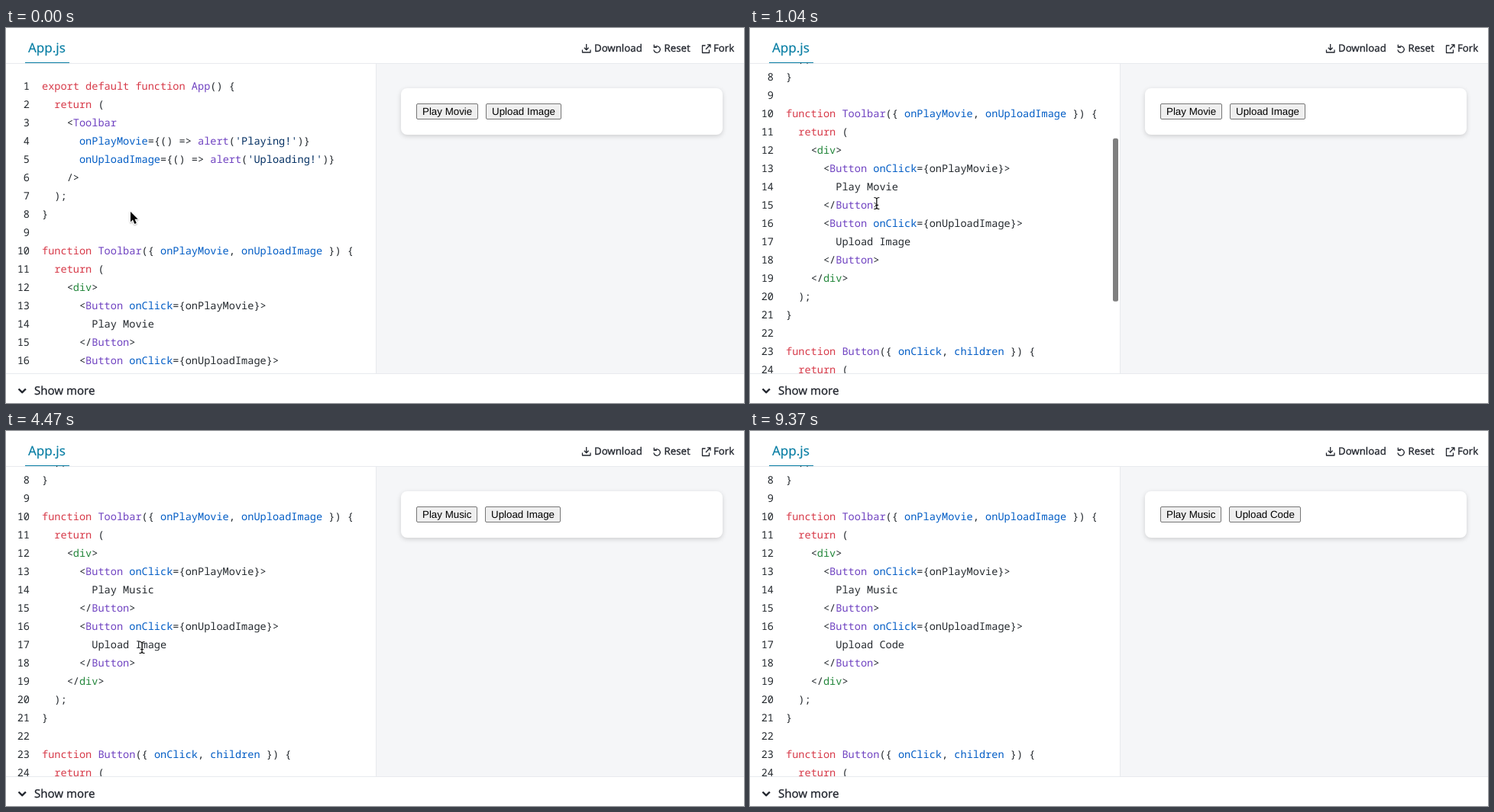
Recreate the animation shown at these times as an HTML page with a canvas. Size 966 by 492 pixels, loop 9670 ms.

```html
<!DOCTYPE html>
<html lang="en">
<head>
<meta charset="utf-8">
<title>Code sandbox</title>
<style>
  html, body { margin: 0; width: 966px; height: 492px; overflow: hidden; background: #fff; }
  canvas { display: block; }
</style>
</head>
<body>
<canvas id="stage" width="966" height="492"></canvas>
<script>
const ctx = document.getElementById('stage').getContext('2d');
const LOOP = 9670, TICK = 148.8;
const CHAR = 8.16, ROW = 24, LEFT = 47, TOP = 65;
const MONO = '13.6px "Noto Sans Mono", monospace';
const UI = '"Noto Sans", sans-serif';
const INK = '#24292e', TEAL = '#087ea4', LINE = '#e8eaee';
// string, keyword, property, definition, tag
const COLORS = ['#032f62', '#d73a49', '#005cc5', '#6f42c1', '#22863a'];
const TOKEN = /('.*?')|\b(export|default|function|return)\b|(\w+(?==\{|,| \}\)))|(\w+(?=\()|(?<=<\/?)[A-Z]\w*)|((?<=<\/?)[a-z]+)|\w+|\W/g;

const source = (first, second) => `export default function App() {
  return (
    <Toolbar
      onPlayMovie={() => alert('Playing!')}
      onUploadImage={() => alert('Uploading!')}
    />
  );
}

function Toolbar({ onPlayMovie, onUploadImage }) {
  return (
    <div>
      <Button onClick={onPlayMovie}>
        Play ${first}
      </Button>
      <Button onClick={onUploadImage}>
        Upload ${second}
      </Button>
    </div>
  );
}

function Button({ onClick, children }) {
  return (`.split('\n');

// Pointer path: tick, x, y
const PATH = [[0, 163, 241], [6, 163, 241], [9, 171.5, 208], [23, 171.5, 208], [29, 178, 284],
  [44, 178, 284], [50, 565, 112], [53, 609, 107], [56, 705, 114], [58, 866, 356], [66, 866, 356]];

const ICONS = new Path2D(`M754.5 28.5v3.5h10.5v-3.5M759.7 21v7.5M756.8 25.7l2.9 3 2.9-3
  M848.3 21.8v3.6h3.6M849 25.2A4.2 4.2 0 1 1 847.9 28.5
  M915.5 23h-4v9.5h9v-4M916 28l5.5-5.8M918 21.8h4v4`);
const CHEVRON = new Path2D('M16.5 473.5l4.7 4.7 4.7-4.7');
const ARROW = new Path2D('M0 0V13.4L3 10.6 5.3 16 7.8 15 5.5 9.7H9.7Z');
const IBEAM = new Path2D('M-3.5-7.5q3 0 3.5 1.7q.5-1.7 3.5-1.7M0-6V6M-3.5 7.5q3 0 3.5-1.7q.5 1.7 3.5 1.7M-2 2.5h4');

const within = (n, ...ranges) => ranges.some(([a, b]) => n >= a && n < b);
const columnX = col => LEFT + col * CHAR;

function box(x, y, w, h, color) {
  ctx.fillStyle = color;
  ctx.fillRect(x, y, w, h);
}

function roundBox(x, y, w, h, r, color) {
  ctx.beginPath();
  ctx.roundRect(x, y, w, h, r);
  ctx.fillStyle = color;
  ctx.fill();
}

function stroke(path, width, color) {
  ctx.lineWidth = width;
  ctx.strokeStyle = color;
  ctx.stroke(path);
}

function text(str, x, y, font, color, weight = 0) {
  ctx.font = font;
  ctx.fillStyle = ctx.strokeStyle = color;
  ctx.fillText(str, x, y);
  if (weight) {
    ctx.lineWidth = weight;
    ctx.strokeText(str, x, y);
  }
}

function pointerAt(n) {
  const i = PATH.findIndex(p => p[0] > n);
  const [t0, x0, y0] = PATH[i - 1], [t1, x1, y1] = PATH[i];
  const k = (n - t0) / (t1 - t0);
  return { x: x0 + (x1 - x0) * k, y: y0 + (y1 - y0) * k };
}

function drawChrome() {
  box(0, 0, 966, 492, '#fff');
  box(485, 47, 481, 406, '#f5f6f8');
  box(0, 46, 966, 1, LINE);
  box(0, 453, 966, 1, LINE);
  box(484, 47, 1, 406, LINE);
  text('App.js', 29, 32, '17px ' + UI, TEAL, 0.15);
  box(25, 45, 58, 1, TEAL);
  for (const [label, x] of [['Download', 770], ['Reset', 861.5], ['Fork', 926]])
    text(label, x, 31, '13.2px ' + UI, '#23272f', 0.3);
  text('Show more', 37, 481, '15px ' + UI, '#23272f', 0.3);
  stroke(ICONS, 1.3, '#23272f');
  stroke(CHEVRON, 2.4, '#23272f');
}

function drawCode(n) {
  const p = Math.min(1, Math.max(0, (n - 1) / 5));
  const scroll = Math.round(180 * (1 - (1 - p) ** 2));
  const first = n < 16 ? 'Movie' : 'Music'.slice(0, n - 15);
  const second = n < 37 ? 'Image' : 'Code'.slice(0, n - 36);
  const rowY = line => TOP + (line - 1) * ROW - scroll;

  ctx.save();
  ctx.beginPath();
  ctx.rect(0, 46, 484, 407);
  ctx.clip();
  if (within(n, [11, 16])) box(153, rowY(14), 41, ROW, '#b4d5fe');
  if (within(n, [33, 37])) box(169, rowY(17), 41, ROW, '#b4d5fe');

  source(first, second).forEach((code, i) => {
    const y = rowY(i + 1) + 16, number = String(i + 1);
    text(number, 31 - number.length * CHAR, y, MONO, INK);
    for (const m of code.matchAll(TOKEN)) {
      const kind = m.slice(1).findIndex(Boolean);
      text(m[0], columnX(m.index), y, MONO, COLORS[kind] || INK);
    }
  });

  const caret = (line, col) => box(Math.floor(columnX(col)), rowY(line) + 3, 1, 17, TEAL);
  if (within(n, [16, 23], [27, 30])) caret(14, 13 + first.length);
  if (n === 32) caret(17, 16);
  if (within(n, [37, 43], [47, 50], [53, 57], [60, 63])) caret(17, 15 + second.length);
  if (within(n, [2, 10])) roundBox(475, 47 + scroll * 0.543, 7, 214, 2.5, '#7f7f7f');
  ctx.restore();
}

function drawPreview(n, pointer) {
  ctx.save();
  ctx.shadowColor = 'rgba(0,0,0,.16)';
  ctx.shadowBlur = 6;
  ctx.shadowOffsetY = 2;
  roundBox(517, 79, 421, 61, 8, '#fff');
  ctx.restore();

  let x = 537;
  for (const label of [n < 24 ? 'Play Movie' : 'Play Music', n < 44 ? 'Upload Image' : 'Upload Code']) {
    const font = '13.333px "Liberation Sans", Arial, sans-serif';
    ctx.font = font;
    const w = Math.round(ctx.measureText(label).width) + 16;
    const hover = within(pointer.x, [x, x + w]) && within(pointer.y, [99, 120]);
    roundBox(x + 0.5, 99.5, w - 1, 20, 1.5, hover ? '#e1e1e1' : '#efefef');
    ctx.lineWidth = 1;
    ctx.strokeStyle = '#767676';
    ctx.stroke();
    text(label, x + 8, 114, font, '#000');
    x += w + 10;
  }
}

function drawPointer(n, { x, y }) {
  if (within(n, [16, 24], [37, 43], [59, 66])) return;
  ctx.save();
  ctx.translate(x, y);
  if (n >= 7 && x < 484) {
    stroke(IBEAM, 2.4, 'rgba(255,255,255,.7)');
    stroke(IBEAM, 1.2, '#000');
  } else {
    ctx.shadowColor = 'rgba(0,0,0,.3)';
    ctx.shadowBlur = 2;
    ctx.shadowOffsetY = 1;
    stroke(ARROW, 2, '#fff');
    ctx.shadowColor = 'transparent';
    ctx.fillStyle = '#000';
    ctx.fill(ARROW);
  }
  ctx.restore();
}

function frame() {
  const n = Math.floor((performance.now() % LOOP + 12) / TICK);
  const pointer = pointerAt(n);
  ctx.textRendering = 'geometricPrecision';
  ctx.lineJoin = 'round';
  drawChrome();
  drawCode(n);
  drawPreview(n, pointer);
  drawPointer(n, pointer);
  requestAnimationFrame(frame);
}
frame();
</script>
</body>
</html>
```
